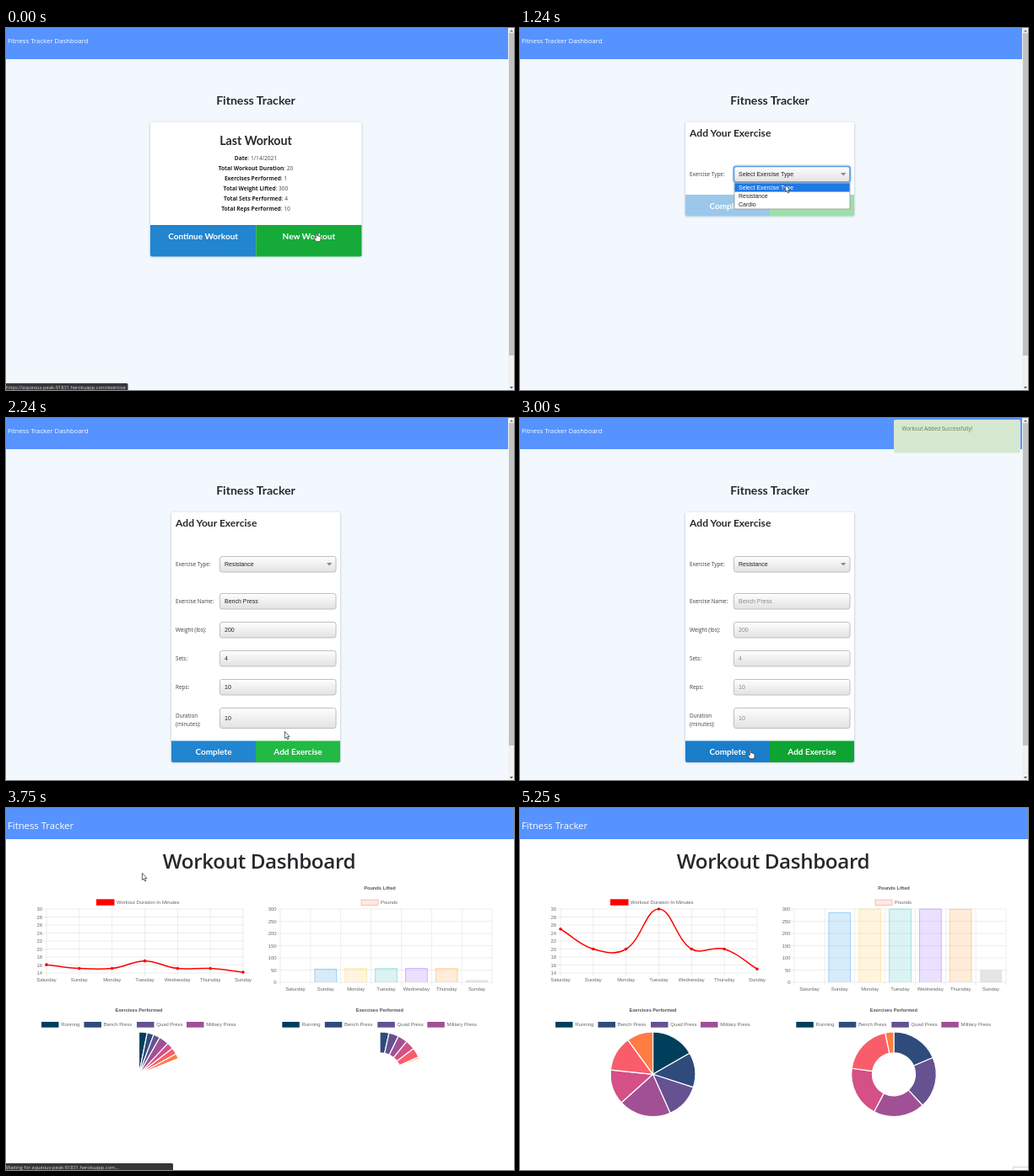
Write an HTML page that moves like this. It is 602 by 430 pixels and loops after 5500 ms.

```html
<!DOCTYPE html>
<html lang="en">
<head>
<meta charset="utf-8">
<title>Fitness Tracker</title>
<style>
html, body { margin: 0; width: 100%; height: 100%; overflow: hidden; background: #fff; }
svg { display: block; width: 602px; height: 430px; }
text { white-space: pre; }
.ui { font-family: "Open Sans", "Noto Sans", sans-serif; }
.lato { font-family: Lato, sans-serif; font-weight: 700; }
.arial { font-family: "Liberation Sans", Arial, sans-serif; }
</style>
</head>
<body>
<svg id="stage" viewBox="0 0 602 430" xmlns="http://www.w3.org/2000/svg"></svg>
<script>
const LOOP = 5500;
const HOST = 'aqueous-peak-91831.herokuapp.com';
const WAIT = { text: `Waiting for ${HOST}...`, w: 198 };
const LINK = { text: `https://${HOST}/exercise`, w: 144.5 };
const BLUE = '#2185d0', GREEN = '#21ba45', DIM = ['#9bc8ea', '#9be0ab'];
const DAYS = ['Saturday', 'Sunday', 'Monday', 'Tuesday', 'Wednesday', 'Thursday', 'Sunday'];
const MINUTES = [25, 20, 20, 30, 20, 20, 15];
const POUNDS = [0, 285, 300, 300, 300, 299, 50];
const SLICES = ['#003f5c', '#2f4b7c', '#665191', '#a05195', '#d45087', '#f95d6a', '#ff7c43'];
const BARS = ['255,99,132', '54,162,235', '255,206,86', '75,192,192', '153,102,255', '255,159,64'];
const CHART_START = 3699;

// Each step keeps the values of the one before it unless it changes them.
const STEPS = [
  [0, { page: 'last', green: '#16ab39', cur: ['hand', 368, 243], status: LINK }],
  [500, { green: '#198f35', status: WAIT }],
  [760, { page: 'form', colors: DIM, cur: ['arrow', 366, 239.5] }],
  [1010, { status: null, cur: ['arrow', 326, 201] }],
  [1240, { focus: true, pick: 0, cur: ['arrow', 314, 186] }],
  [1490, { pick: 1, cur: ['arrow', 310.5, 195] }],
  [1740, { pick: -1, open: true }],
  [1990, { focus: false, cur: ['arrow', 221, 231] }],
  [2240, { filled: true, colors: [BLUE, GREEN], cur: ['arrow', 330, 372] }],
  [2490, { filled: false, colors: [BLUE, '#0ea432'], cur: ['hand', 330, 394] }],
  [2740, { toast: 0.7 }],
  [3000, { toast: 1, colors: ['#1a7dca', '#0ea432'], cur: ['hand', 273, 394] }],
  [3250, { toast: 0.2, status: WAIT }],
  [3500, { toast: 0, colors: [BLUE, '#0ea432'], cur: ['arrow', 214, 232] }],
  [3750, { page: 'dash', cur: ['arrow', 161, 77] }],
  [4000, { cur: ['arrow', 239.5, 116], fade: 0.35 }],
  [4250, { status: null }],
  [4500, { cur: ['arrow', 420, 300] }],
  [4750, { cur: ['arrow', 593, 426] }],
  [5250, { cur: null, tip: true }]
];
const states = [];
STEPS.forEach(([time, change], i) => states.push({ ...states[i - 1], ...change, time }));

const rect = (x, y, w, h, fill, more = '') =>
  `<rect x="${x}" y="${y}" width="${w}" height="${h}" fill="${fill}" ${more}/>`;
const path = (d, fill, more = '') => `<path d="${d}" fill="${fill}" ${more}/>`;
const text = (x, y, str, size, font, fill, more = '') =>
  `<text x="${x}" y="${y}" class="${font}" font-size="${size}" fill="${fill}" ${more}>${str}</text>`;
const MID = 'text-anchor="middle"', END = 'text-anchor="end"', BOLD = 'font-weight="600"';

const DEFS = `<defs>
<linearGradient id="field" x1="0" y1="0" x2="0" y2="1">
<stop offset="0" stop-color="#fefefe"/><stop offset="1" stop-color="#e2e2e2"/></linearGradient>
<filter id="soft" x="-10%" y="-10%" width="120%" height="120%"><feGaussianBlur stdDeviation="1.3"/></filter>
</defs>`;

function card(x, w, bottom, split, labels, colors, base) {
  const mid = x + w / 2, h = bottom - split;
  return rect(x - 0.3, 112.5, w + 0.6, bottom - 112, '#8d9cad', 'rx="2" opacity=".6" filter="url(#soft)"') +
    rect(x, 112, w, bottom - 112, '#fff', 'rx="2"') +
    path(`M${x} ${split}H${mid}V${bottom}H${x + 2}q-2 0-2-2z`, colors[0]) +
    path(`M${mid} ${split}h${w / 2}v${h - 2}q0 2-2 2H${mid}z`, colors[1]) +
    labels.map((s, i) => text(x + w * (0.25 + i / 2), base, s, 10, 'lato', '#fff', MID)).join('');
}

function frame() {
  return rect(0, 0, 595, 430, '#f3f8ff') + rect(0, 0, 595, 37, '#5693ff') +
    text(2, 17.8, 'Fitness Tracker Dashboard', 7.75, 'ui', '#fff') +
    rect(595, 0, 7, 430, '#f1f1f1') + rect(596, 6, 6, 383, '#c1c1c1') +
    path('M597 4.5l2-2.5 2 2.5z', '#777') + path('M597 426l2 2.5 2-2.5z', '#555') +
    text(296, 91.3, 'Fitness Tracker', 14.1, 'lato', '#27292b', MID);
}

function lastPage(s) {
  const rows = [['Date', '1/14/2021'], ['Total Workout Duration', 20], ['Exercises Performed', 1],
    ['Total Weight Lifted', 300], ['Total Sets Performed', 4], ['Total Reps Performed', 10]];
  return frame() +
    card(171, 250.5, 271.5, 234, ['Continue Workout', 'New Workout'], [BLUE, s.green], 251) +
    text(296, 139, 'Last Workout', 14.2, 'lato', '#27292b', MID) +
    rows.map(([k, v], i) => text(296, 157 + i * 12,
      `<tspan font-weight="700" fill="#222">${k}</tspan>: ${v}`, 6.6, 'ui', '#444', MID)).join('');
}

const field = (y, h, str, fill) =>
  rect(253.5, y + 0.5, 137.5, h, 'url(#field)', 'rx="2.5" stroke="#b9b9b9" stroke-width=".9"') +
  text(259, y + h / 2 + 2.8, str, 7, 'arial', fill);
const label = (y, str) => text(201, y, str, 6.4, 'ui', '#3c3f42');

function formPage(s) {
  const split = s.open ? 383.5 : 198;
  let out = frame() +
    card(196, 200, split + 25.5, split, ['Complete', 'Add Exercise'], s.colors, split + 16.7) +
    text(201, 129, 'Add Your Exercise', 12.1, 'lato', '#27292b') +
    label(176.3, 'Exercise Type:');
  if (s.focus) out += rect(252.3, 163.3, 140, 21, '#7fb5f2', 'rx="4" opacity=".75" filter="url(#soft)"');
  out += field(164, 18.5, s.open ? 'Resistance' : 'Select Exercise Type', '#222');
  if (s.focus) out += rect(253.5, 164.5, 137.5, 18.5, 'none', 'rx="2.5" stroke="#5b9be0" stroke-width="1.6"');
  out += path('M380 172h6.4l-3.2 3.4z', '#8a8a8a');
  if (s.open) {
    const rows = [['Exercise Name:', 'Bench Press'], ['Weight (lbs):', 200], ['Sets:', 4], ['Reps:', 10]];
    const ink = s.filled ? '#222' : '#8a8a8a';
    rows.forEach(([k, v], i) => {
      out += label(220.3 + i * 34, k) + field(208 + i * 34, 18.5, v, ink);
    });
    out += label(356.3, 'Duration') + label(366, '(minutes):') + field(344, 24, 10, ink);
  }
  if (s.pick >= 0) {
    out += rect(254, 184, 137, 31, '#fff', 'stroke="#8a8a8a" stroke-width=".7"');
    ['Select Exercise Type', 'Resistance', 'Cardio'].forEach((str, i) => {
      const on = i === s.pick;
      if (on) out += rect(254.4, 184.4 + i * 10.2, 136.2, 10.2, '#1e78e6');
      out += text(259, 192 + i * 10.2, str, 7, 'arial', on ? '#fff' : '#222');
    });
  }
  if (s.toast) {
    out += `<g opacity="${s.toast}">` + rect(443, 2, 150, 39.5, '#d6e8cf', 'rx="2"') +
      text(452.5, 15.4, 'Workout Added Successfully!', 6.25, 'ui', '#5c7f57') + '</g>';
  }
  return out;
}

const tick = (x, y, str, more = MID) => text(x, y, str, 5.9, 'arial', '#666', more);
const title = (x, y, str) => text(x, y, str, 5.65, 'arial', '#555', MID + ' font-weight="700"');
const rule = (d) => path(d, 'none', 'stroke="#e6e6e6" stroke-width=".7"');

function lineChart(p) {
  const x0 = 48, dx = 233 / 6, y0 = 196, unit = 76 / 16;
  let out = rect(107, 108.3, 21.5, 7.4, '#f00') + tick(131, 114, 'Workout Duration In Minutes', '');
  for (let v = 14; v <= 30; v += 2) {
    const y = y0 - (v - 14) * unit;
    out += rule(`M44.5 ${y}H281`) + tick(43, y + 2, v, END);
  }
  DAYS.forEach((d, i) => {
    out += rule(`M${x0 + i * dx} 120V199.5`) + tick(x0 + i * dx, 206.2, d);
  });
  const pts = MINUTES.map((v, i) => ({ x: x0 + i * dx, y: y0 - (v - 14) * unit }));
  const place = (x, y) => `${x.toFixed(2)} ${(y0 + (Math.min(y0, Math.max(120, y)) - y0) * p).toFixed(2)}`;
  const gap = (a, b) => Math.hypot(a.x - b.x, a.y - b.y);
  const ctrl = pts.map((c, i) => {
    const a = pts[i - 1] || c, b = pts[i + 1] || c;
    const da = gap(a, c), db = gap(c, b), k = 0.4 / (da + db);
    return [place(c.x - k * da * (b.x - a.x), c.y - k * da * (b.y - a.y)),
      place(c.x + k * db * (b.x - a.x), c.y + k * db * (b.y - a.y))];
  });
  const d = pts.map((c, i) => i ? `C${ctrl[i - 1][1]} ${ctrl[i][0]} ${place(c.x, c.y)}` : `M${place(c.x, c.y)}`);
  out += path(d.join(''), 'none', 'stroke="#f00" stroke-width="1.5"');
  pts.forEach(c => {
    out += `<circle cx="${c.x}" cy="${y0 + (c.y - y0) * p}" r="1.8" fill="#f00"/>`;
  });
  return out;
}

function barChart(p) {
  const x0 = 325, dx = 251 / 7, y0 = 207, unit = 87 / 300, w = dx * 0.72;
  let out = title(443, 97.4, 'Pounds Lifted') +
    rect(421, 109, 20, 6.5, 'rgba(255,110,80,.16)', 'stroke="#ee9c8c" stroke-width=".6"') +
    tick(444, 114, 'Pounds', '');
  for (let v = 0; v <= 300; v += 50) {
    const y = y0 - v * unit;
    out += rule(`M321.5 ${y}H576`) + tick(320.5, y + 2, v, END);
  }
  for (let i = 0; i < 8; i++) out += rule(`M${x0 + i * dx} 120V210.5`);
  POUNDS.forEach((v, i) => {
    const mid = x0 + (i + 0.5) * dx, x = mid - w / 2, h = v * unit * p, c = BARS[i];
    out += tick(mid, 216.8, DAYS[i]);
    if (!v) return;
    out += rect(x, y0 - h, w, h, c ? `rgba(${c},.2)` : 'rgba(0,0,0,.1)');
    if (c) out += path(`M${x} ${y0}v${-h}h${w}v${h}`, 'none', `stroke="rgba(${c},.8)" stroke-width=".55"`);
  });
  return out;
}

function legend(x) {
  const items = [[0, 'Running'], [50.5, 'Bench Press'], [113, 'Quad Press'], [172, 'Military Press']];
  return title(x + 115.5, 242.2, 'Exercises Performed') + items.map(([dx, str], i) =>
    rect(x + dx, 254, 20.5, 6.7, SLICES[i]) + tick(x + dx + 23.3, 259.4, str, '')).join('');
}

function ring(cx, inner, data, p) {
  const cy = 316.3, r = 50.3, sum = data.reduce((a, b) => a + b);
  const at = (q, a) => `${(cx + q * Math.sin(a)).toFixed(2)} ${(cy - q * Math.cos(a)).toFixed(2)}`;
  let a = 0, out = '';
  data.forEach((v, i) => {
    const b = a + v / sum * 2 * Math.PI * p;
    const hole = inner ? `L${at(inner, b)}A${inner} ${inner} 0 0 0 ${at(inner, a)}` : `L${cx} ${cy}`;
    if (v) out += path(`M${at(r, a)}A${r} ${r} 0 0 1 ${at(r, b)}${hole}Z`, SLICES[i],
      'stroke="#fff" stroke-width="1.2" stroke-linejoin="round"');
    a = b;
  });
  return out;
}

function dashPage(s) {
  const u = Math.min(1, (s.time - CHART_START) / 1000);
  const p = 1 - Math.pow(1 - u, 4);
  return rect(0, 0, 602, 430, '#fff') + rect(0, 0, 602, 37, '#5693ff') +
    text(2, 24.9, 'Fitness Tracker', 11.3, 'ui', '#fff') +
    text(300, 71.7, 'Workout Dashboard', 24.2, 'ui', '#25292d', `${MID} ${BOLD} letter-spacing="-.37"`) +
    lineChart(p) + barChart(p) + legend(42) + legend(327.3) +
    ring(157.5, 0, MINUTES, p) + ring(443, 25.5, POUNDS, p) +
    (s.tip ? rect(584.5, 426.5, 20, 8, '#fff', 'stroke="#d4d4d4"') : '');
}

function cursor([kind, x, y]) {
  const d = kind === 'arrow'
    ? 'M.4.4V8.6L2.2 7 3.5 10 4.9 9.4 3.6 6.5H6z'
    : 'M-.8 .8Q0-.2.8.8V4Q1.8 3.4 2.4 4.2 3.4 3.8 3.8 4.7 5 4.6 5 5.8V8Q4.8 9.6 4 10.8H-.6Q-2 8.6-3.2 6.6-2.8 5.2-.8 7z';
  return `<g transform="translate(${x} ${y})">` +
    path(d, '#fff', 'stroke="#333" stroke-width=".75" stroke-linejoin="round"') + '</g>';
}

function statusBar(s) {
  const fade = s.page === 'dash' && s.fade || 1;
  return `<g opacity="${fade}">` + rect(-2, 422, s.status.w + 2, 10, '#35383b', 'rx="1.5"') +
    text(0, 429, s.status.text, 5.68, 'ui', '#d6d8da') + '</g>';
}

const pages = { last: lastPage, form: formPage, dash: dashPage };
const stage = document.getElementById('stage');
let shown = null;

function draw(t) {
  const s = states.filter(q => q.time <= t).pop();
  if (s === shown) return;
  shown = s;
  stage.innerHTML = DEFS + pages[s.page](s) + (s.status ? statusBar(s) : '') + (s.cur ? cursor(s.cur) : '');
}

const start = performance.now();
function loop() {
  draw((performance.now() - start) % LOOP);
  requestAnimationFrame(loop);
}
loop();
</script>
</body>
</html>
```
